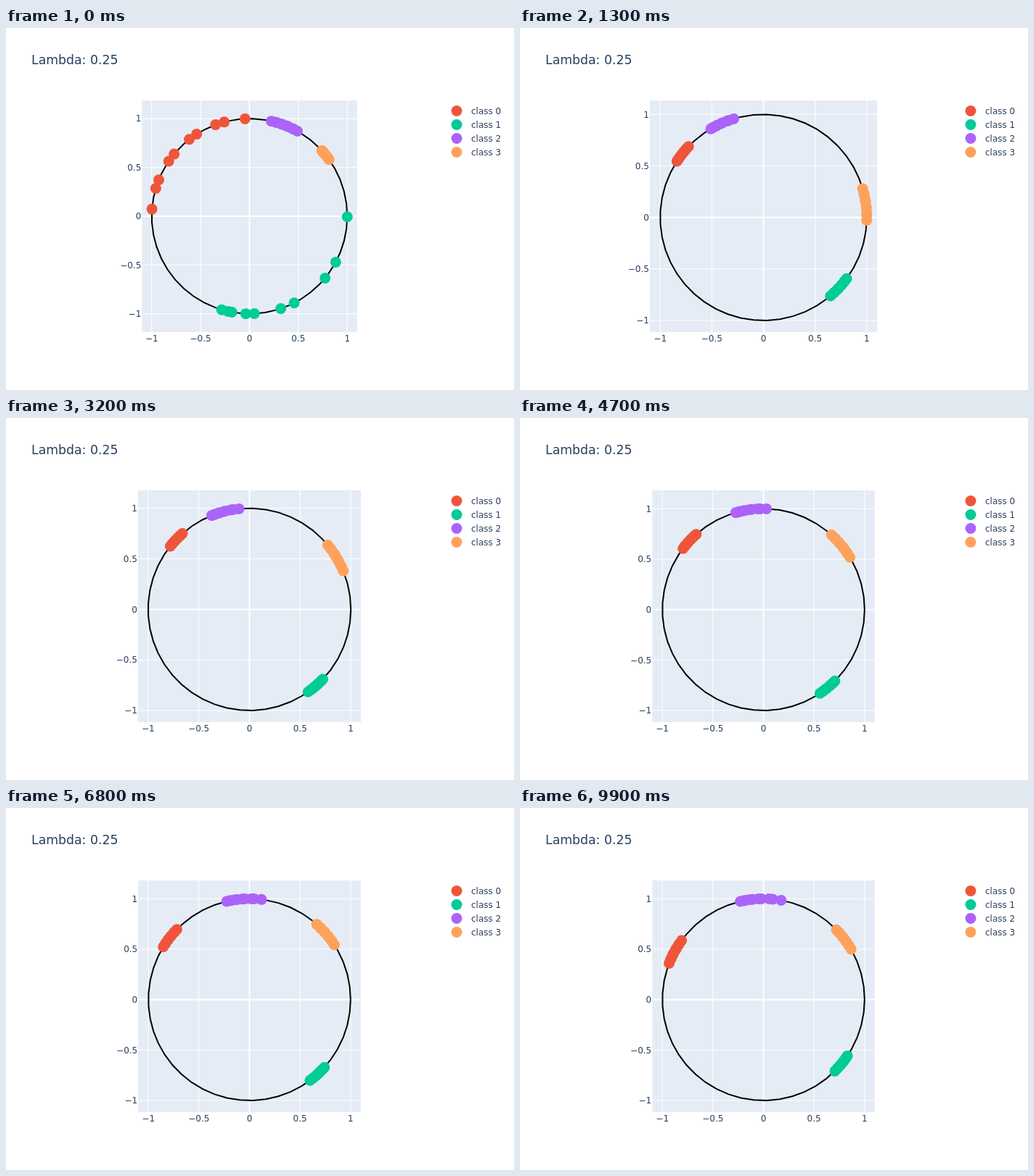
Write an HTML page with a canvas that moves like this. It is 700 px wide and 500 px high and loops after 10000 ms.

```html
<!DOCTYPE html>
<html lang="en">
<head>
<meta charset="utf-8">
<title>Points on a circle</title>
<style>
html, body { margin: 0; width: 100%; height: 100%; overflow: hidden; background: #fff; }
canvas { display: block; }
</style>
</head>
<body>
<canvas id="stage" width="700" height="500"></canvas>
<script>
const ctx = document.getElementById('stage').getContext('2d');
const FONT = '"DejaVu Sans", Verdana, sans-serif';
const TOP = 100, HEIGHT = 320, CX = 335.5;
const LINE_PAD = 16, DOT_PAD = 25.375, DOT_R = 7.5;
const STEP = 100, LOOP = 10000, SETTLE = 350;
const COUNT = 10;
const TIMES = [0, 1300, 3200, 4700, 6800, 9900];
const TICKS = [-1, -0.5, 0, 0.5, 1];

// Each class is an arc of points, in degrees.
// mid: its centre at each of TIMES; half: its half width at the start,
// and the line from first to last that it settles on;
// bend: how far points lean to one end, at the start and once settled.
const classes = [
  { color: '#EF553B', mid: [134.2, 141.7, 136.4, 137.2, 142.2, 151.5], half: [41.6, 3.8, 7.4], bend: [0, 0] },
  { color: '#00CC96', mid: [-53.4, -43, -49.2, -50.6, -47.7, -39.5], half: [53.1, 5.4, 5.6], bend: [-.25, .05] },
  { color: '#AB63FA', mid: [68.9, 113.7, 103.9, 97.1, 93.1, 91.6], half: [8.2, 6.2, 11.7], bend: [0, .13] },
  { color: '#FFA15A', mid: [38.9, 7.3, 30.9, 39.5, 40.6, 36.9], half: [3.4, 9.4, 6.9], bend: [.18, 0] }
];

const lerp = (a, b, u) => a + (b - a) * u;

// Smooth curve through the keys that does not overshoot them.
function curve(values) {
  const last = values.length - 1;
  const d = values.slice(1).map((v, i) => (v - values[i]) / (TIMES[i + 1] - TIMES[i]));
  const m = values.map((_, i) => {
    const a = d[i - 1], b = d[i];
    return a * b > 0 ? 2 * a * b / (a + b) : 0;
  });
  m[0] = (3 * d[0] - m[1]) / 2;
  m[last] = (3 * d[last - 1] - m[last - 1]) / 2;
  return t => {
    let i = 0;
    while (i < last - 1 && t > TIMES[i + 1]) i++;
    const h = TIMES[i + 1] - TIMES[i], u = (t - TIMES[i]) / h, w = 1 - u;
    return values[i] * w * w * (1 + 2 * u) + values[i + 1] * u * u * (3 - 2 * u)
      + h * u * w * (m[i] * w - m[i + 1] * u);
  };
}

for (const c of classes) c.midAt = curve(c.mid);

function classDots({ color, midAt, half, bend }, t) {
  const early = Math.exp(-t / SETTLE);
  const [start, first, last] = half;
  const reach = lerp(first, last, t / LOOP) + (start - first) * early;
  const lean = lerp(bend[1], bend[0], early);
  return Array.from({ length: COUNT }, (_, k) => {
    const u = (k + .4 * (k % 2)) / (COUNT - .6); // neighbours sit in loose pairs
    const along = u + lean * Math.sin(Math.PI * u);
    const a = (midAt(t) + reach * (2 * along - 1)) * Math.PI / 180;
    return { x: Math.cos(a), y: Math.sin(a), color };
  });
}

// Vertical scale and zero line that leave room for both the ring and the dots.
function fit(ys) {
  const tops = [[1, LINE_PAD], [Math.max(...ys), DOT_PAD]];
  const bottoms = [[-1, LINE_PAD], [Math.min(...ys), DOT_PAD]];
  let best = { scale: Infinity };
  for (const [hi, padHi] of tops) for (const [lo, padLo] of bottoms) {
    const scale = (HEIGHT - padHi - padLo) / (hi - lo);
    if (scale < best.scale) best = { scale, zero: TOP + padHi + hi * scale };
  }
  return best;
}

function dot(x, y, color) {
  ctx.fillStyle = color;
  ctx.beginPath();
  ctx.arc(x, y, DOT_R, 0, 2 * Math.PI);
  ctx.fill();
}

function text(str, x, y, align = 'left', size = 12) {
  ctx.fillStyle = '#2a3f5f';
  ctx.font = `${size}px ${FONT}`;
  ctx.textAlign = align;
  ctx.fillText(str, x, y);
}

function draw(t) {
  const dots = classes.flatMap(c => classDots(c, t));
  const { scale, zero } = fit(dots.map(p => p.y));
  const px = x => CX + x * scale, py = y => zero - y * scale;
  const left = px(-1.1), width = 2.2 * scale;

  ctx.fillStyle = '#fff';
  ctx.fillRect(0, 0, 700, 500);
  ctx.fillStyle = '#E5ECF6';
  ctx.fillRect(left, TOP, width, HEIGHT);

  ctx.fillStyle = '#fff';
  for (const v of TICKS) {
    const w = v ? 1 : 2;
    ctx.fillRect(px(v) - w / 2, TOP, w, HEIGHT);
    ctx.fillRect(left, py(v) - w / 2, width, w);
  }

  ctx.beginPath();
  for (let i = 0; i < 50; i++) {
    const a = 2 * Math.PI * i / 49;
    ctx.lineTo(px(Math.cos(a)), py(Math.sin(a)));
  }
  ctx.strokeStyle = '#000';
  ctx.lineWidth = 2;
  ctx.stroke();

  for (const p of dots) dot(px(p.x), py(p.y), p.color);

  for (const v of TICKS) {
    const label = String(v).replace('-', '\u2212');
    text(label, px(v), 433, 'center');
    text(label, left - 1, py(v) + 4.2, 'right');
  }
  text('Lambda: 0.25', 35, 50, 'left', 17.3);
  classes.forEach((c, i) => {
    dot(621, 114.5 + 19 * i, c.color);
    text('class ' + i, 641, 119 + 19 * i);
  });
}

const begin = performance.now();
function frame() {
  const t = (performance.now() - begin) % LOOP;
  draw(Math.floor(t / STEP) * STEP);
  requestAnimationFrame(frame);
}
frame();
</script>
</body>
</html>
```
